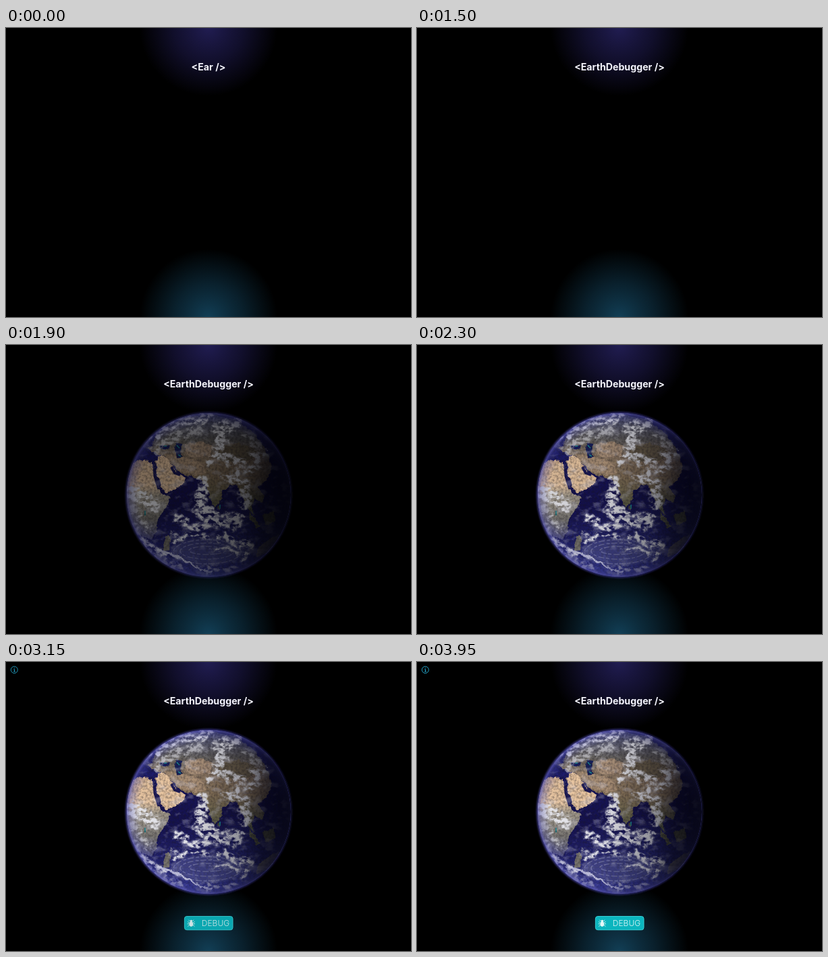
An HTML page that plays this animation: 600 px wide and 429 px high, repeating every 4050 ms.

```html
<!DOCTYPE html>
<html lang="en">
<head>
<meta charset="utf-8">
<title>EarthDebugger</title>
<style>
  html, body { margin: 0; width: 100%; height: 100%; overflow: hidden; background: #000; }
  svg { position: absolute; left: 0; top: 0; width: 600px; height: 429px; }
  text { font-family: Inter, Roboto, sans-serif; text-anchor: middle; }
  .fade { opacity: 0; will-change: opacity; }
  .clouds { fill: none; stroke: #e2e2e8; stroke-linecap: round; stroke-linejoin: round; }
</style>
</head>
<body>
<svg viewBox="0 0 600 429">
  <defs>
    <radialGradient id="violet">
      <stop offset="0" stop-color="#211d52"/>
      <stop offset=".5" stop-color="#1e1a4c" stop-opacity=".58"/>
      <stop offset="1" stop-color="#1e1a4c" stop-opacity="0"/>
    </radialGradient>
    <radialGradient id="teal">
      <stop offset="0" stop-color="#123f56"/>
      <stop offset=".5" stop-color="#113a50" stop-opacity=".56"/>
      <stop offset="1" stop-color="#113a50" stop-opacity="0"/>
    </radialGradient>
  </defs>
  <circle cx="300" cy="-1" r="102" fill="url(#violet)"/>
  <circle cx="300" cy="430" r="102" fill="url(#teal)"/>
  <text id="title" x="300" y="63" font-size="14.2" font-weight="700" fill="#f4f4fc"></text>
</svg>

<svg id="earth" class="fade" viewBox="0 0 600 429">
  <defs>
    <clipPath id="disc"><circle cx="300.5" cy="222.5" r="121.5"/></clipPath>
    <linearGradient id="limb">
      <stop offset="0" stop-color="#5451b4"/>
      <stop offset=".6" stop-color="#302d80"/>
      <stop offset="1" stop-color="#141238"/>
    </linearGradient>
    <linearGradient id="sea" x2=".2" y2="1">
      <stop offset="0" stop-color="#34386a"/>
      <stop offset=".3" stop-color="#18165c"/>
      <stop offset=".6" stop-color="#15124f"/>
      <stop offset="1" stop-color="#30338a"/>
    </linearGradient>
    <linearGradient id="africa" x2="0" y2="1">
      <stop offset="0" stop-color="#dbb894"/>
      <stop offset=".32" stop-color="#eccaa6"/>
      <stop offset=".46" stop-color="#a39a8b"/>
      <stop offset=".75" stop-color="#7b7874"/>
      <stop offset="1" stop-color="#56568a"/>
    </linearGradient>
    <linearGradient id="asia" x2="0" y2="1">
      <stop offset="0" stop-color="#50547c"/>
      <stop offset=".25" stop-color="#625f5d"/>
      <stop offset=".42" stop-color="#8e7964"/>
      <stop offset=".62" stop-color="#8d785c"/>
      <stop offset="1" stop-color="#5f6549"/>
    </linearGradient>
    <radialGradient id="rim">
      <stop offset=".86" stop-color="#3c3c9a" stop-opacity="0"/>
      <stop offset=".96" stop-color="#45459e" stop-opacity=".36"/>
      <stop offset="1" stop-color="#605ebe" stop-opacity=".8"/>
    </radialGradient>
    <linearGradient id="night" x1="0" y1=".46" x2="1" y2=".54">
      <stop offset=".4" stop-color="#02020c" stop-opacity="0"/>
      <stop offset=".7" stop-color="#02020c" stop-opacity=".36"/>
      <stop offset=".84" stop-color="#02020c" stop-opacity=".7"/>
      <stop offset="1" stop-color="#02020c" stop-opacity=".9"/>
    </linearGradient>
    <filter id="soft"><feGaussianBlur stdDeviation="1.6"/></filter>
    <filter id="coast" color-interpolation-filters="sRGB">
      <feTurbulence type="fractalNoise" baseFrequency=".13" numOctaves="3" seed="4"/>
      <feDisplacementMap in="SourceGraphic" scale="6" xChannelSelector="R" yChannelSelector="G"/>
      <feGaussianBlur stdDeviation=".4"/>
    </filter>
    <filter id="wisps" x="-10%" y="-10%" width="120%" height="120%" color-interpolation-filters="sRGB">
      <feTurbulence type="fractalNoise" baseFrequency=".06" numOctaves="4" seed="9" result="warp"/>
      <feTurbulence type="fractalNoise" baseFrequency=".13 .18" numOctaves="4" seed="15"/>
      <feColorMatrix values="0 0 0 0 1  0 0 0 0 1  0 0 0 0 1  4.4 0 0 0 -1.55" result="holes"/>
      <feGaussianBlur in="SourceGraphic" stdDeviation="1.6"/>
      <feDisplacementMap in2="warp" scale="22" xChannelSelector="G" yChannelSelector="B"/>
      <feComposite in2="holes" operator="in"/>
    </filter>
    <filter id="haze" x="0" y="0" width="100%" height="100%" color-interpolation-filters="sRGB">
      <feTurbulence type="fractalNoise" baseFrequency=".05 .08" numOctaves="5" seed="21"/>
      <feColorMatrix values="0 0 0 0 .82  0 0 0 0 .82  0 0 0 0 .88  5 0 0 0 -2.6"/>
    </filter>
    <filter id="grain" x="0" y="0" width="100%" height="100%" color-interpolation-filters="sRGB">
      <feTurbulence type="fractalNoise" baseFrequency=".3" numOctaves="3" seed="3"/>
      <feColorMatrix values="0 0 0 0 .1  0 0 0 0 .09  0 0 0 0 .12  2 0 0 0 -.7"/>
    </filter>
  </defs>

  <circle cx="300.5" cy="222.5" r="121.5" fill="none" stroke="url(#limb)" stroke-width="3" filter="url(#soft)"/>
  <g clip-path="url(#disc)">
    <rect x="178" y="100" width="245" height="245" fill="url(#sea)"/>
    <g filter="url(#coast)">
      <path fill="url(#africa)" d="M184 180 195 171 206 169 216 175 218 190 222 205 229 220 243 226 239 239 229 251 224 263 223 277 215 289 204 285 192 277 174 250 174 195Z"/>
      <path fill="#e8c5a0" d="M222 168 229 163 241 168 247 182 254 191 266 197 263 206 249 215 236 220 230 211 224 193Z"/>
      <path fill="url(#asia)" d="M208 154 217 148 222 137 238 120 265 108 302 103 340 111 367 130 384 154 394 181 386 201 373 211 382 223 378 234 368 227 364 240 370 253 362 248 355 235 347 219 341 208 332 207 320 218 316 235 309 241 302 226 296 209 286 198 270 194 258 190 247 179 238 166 226 163Z"/>
      <path fill="#a98f75" d="M234 160 250 164 270 168 292 174 297 190 283 194 268 191 256 187 246 176Z"/>
      <path fill="#a88f78" d="M265 147 290 143 307 152 302 165 280 168 266 162Z"/>
      <path fill="#6f624c" d="M317 150 345 145 372 156 365 170 335 174 312 169Z"/>
      <path fill="#17205a" d="M252 145 261 147 258 156 262 166 253 167 251 156Z"/>
      <path fill="#19205e" d="M227 147 243 149 241 155 228 154Z"/>
      <path fill="#67684c" d="M315 238 319 242 316 246 313 242Z M359 247 368 257 378 270 372 271 362 259Z M380 253 396 246 399 262 385 268Z"/>
      <path fill="#77736c" d="M238 283 245 287 241 304 234 306 233 292Z M376 299 392 287 405 282 392 306 371 315Z"/>
    </g>
    <path d="M219 178 220 195 226 214" fill="none" stroke="#1b1956" stroke-width="3"/>
    <path d="M245 181 250 190 258 193" fill="none" stroke="#1b1956" stroke-width="4"/>
    <path d="M203 159 212 167 225 168" fill="none" stroke="#1d1c6a" stroke-width="7"/>
    <path d="M253 149 257 153M255 163 259 165M206 246v7M317 237v6M234 150h4" stroke="#1a8f98" stroke-width="1.6"/>
    <rect x="178" y="100" width="245" height="245" filter="url(#grain)" opacity=".4"/>
    <rect x="178" y="100" width="245" height="245" filter="url(#haze)" opacity=".3"/>
    <ellipse cx="298" cy="307" rx="54" ry="21" fill="#7376a6" opacity=".32" filter="url(#soft)"/>
    <g class="clouds" filter="url(#wisps)">
      <path stroke-width="12" d="M211 142 232 124 262 114 302 107 M303 176 313 154 321 134 331 117 M342 191 362 184 377 177"/>
      <path stroke-width="19" d="M182 216 199 224 214 236 M318 123 338 116 M291 203 292 225 M320 143 318 160"/>
      <path stroke-width="13" d="M291 216 286 237 303 249 326 254 349 260 M325 195 343 201 357 209 M352 217 357 235 M330 169 346 176"/>
      <path stroke-width="10" d="M252 257 268 267 290 269 307 265 M320 285 341 293 364 299 M278 244 312 264 337 270 M369 165 383 161"/>
      <path stroke-width="7" d="M200 289 222 304 240 314 M243 288 268 283 299 286 M305 307 334 305 355 314"/>
    </g>
    <g class="clouds" filter="url(#wisps)" opacity=".6">
      <path stroke-width="12" d="M224 151 240 142 256 130 M184 243 201 258 212 274 M270 133 291 126 M352 132 372 150"/>
      <path stroke-width="7" d="M190 270 203 293 227 319 258 335 M300 333 340 330"/>
    </g>
    <g fill="none" stroke="#aeb0d0" stroke-width="1.3" stroke-dasharray="5 2 9 3" opacity=".4">
      <ellipse cx="298" cy="307" rx="50" ry="18"/>
      <ellipse cx="298" cy="306" rx="40" ry="12"/>
      <ellipse cx="298" cy="305" rx="27" ry="6"/>
    </g>
    <path d="M228 305Q252 312 272 324T304 337" fill="none" stroke="#d8d9ee" stroke-width="3" opacity=".75" filter="url(#coast)"/>
    <circle cx="300.5" cy="222.5" r="122" fill="url(#rim)"/>
    <rect x="178" y="100" width="245" height="245" fill="url(#night)"/>
  </g>
</svg>

<svg id="controls" class="fade" viewBox="0 0 600 429">
  <g fill="none" stroke="#25a6cb">
    <circle cx="12.3" cy="11.6" r="5"/>
    <path d="M11.2 10.8H12.5V14M11 14.1H14M12.3 8.3V9.4"/>
  </g>
  <rect x="264.4" y="377.5" width="71.6" height="20.2" rx="3.5" fill="#0bb5be" stroke="#38cdd3"/>
  <g fill="none" stroke="#e3f8f8" stroke-width=".9">
    <path d="M272 384.5 270.5 382.8M276.6 384.5 278.1 382.8M271.5 387 269 385.5M277.1 387 279.6 385.5M271 388.7H268.6M277.6 388.7H280M271.5 390.4 269.2 392.6M277.1 390.4 279.4 392.6"/>
    <ellipse cx="274.3" cy="389" rx="2.9" ry="3.8" fill="#e3f8f8" stroke="none"/>
    <circle cx="274.3" cy="384.6" r="1.8" fill="#e3f8f8" stroke="none"/>
  </g>
  <text x="310.5" y="392" font-size="12" font-weight="300" fill="#e0f7f8">DEBUG</text>
</svg>

<script>
const LOOP = 4050;
const NAME = 'EarthDebugger';
const LETTER_MS = 150;
const FADE_MS = 1100;
const fades = [['earth', 1550], ['controls', 2450]];

const byId = id => document.getElementById(id);
const bezier = (a, b, s) => 3 * (1 - s) ** 2 * s * a + 3 * (1 - s) * s * s * b + s ** 3;

// CSS "ease": cubic-bezier(.25, .1, .25, 1)
function ease(x) {
  if (x <= 0) return 0;
  if (x >= 1) return 1;
  let low = 0, high = 1;
  for (let i = 0; i < 20; i++) {
    const mid = (low + high) / 2;
    if (bezier(.25, .25, mid) < x) low = mid; else high = mid;
  }
  return bezier(.1, 1, low);
}

function render(t) {
  const typed = NAME.slice(0, 3 + Math.floor((t + 60) / LETTER_MS));
  const label = `<${typed} />`;
  const title = byId('title');
  if (title.textContent !== label) title.textContent = label;
  for (const [id, start] of fades) byId(id).style.opacity = ease((t - start) / FADE_MS);
}

const begin = performance.now();
function frame() {
  render((performance.now() - begin) % LOOP);
  requestAnimationFrame(frame);
}
frame();
</script>
</body>
</html>
```
